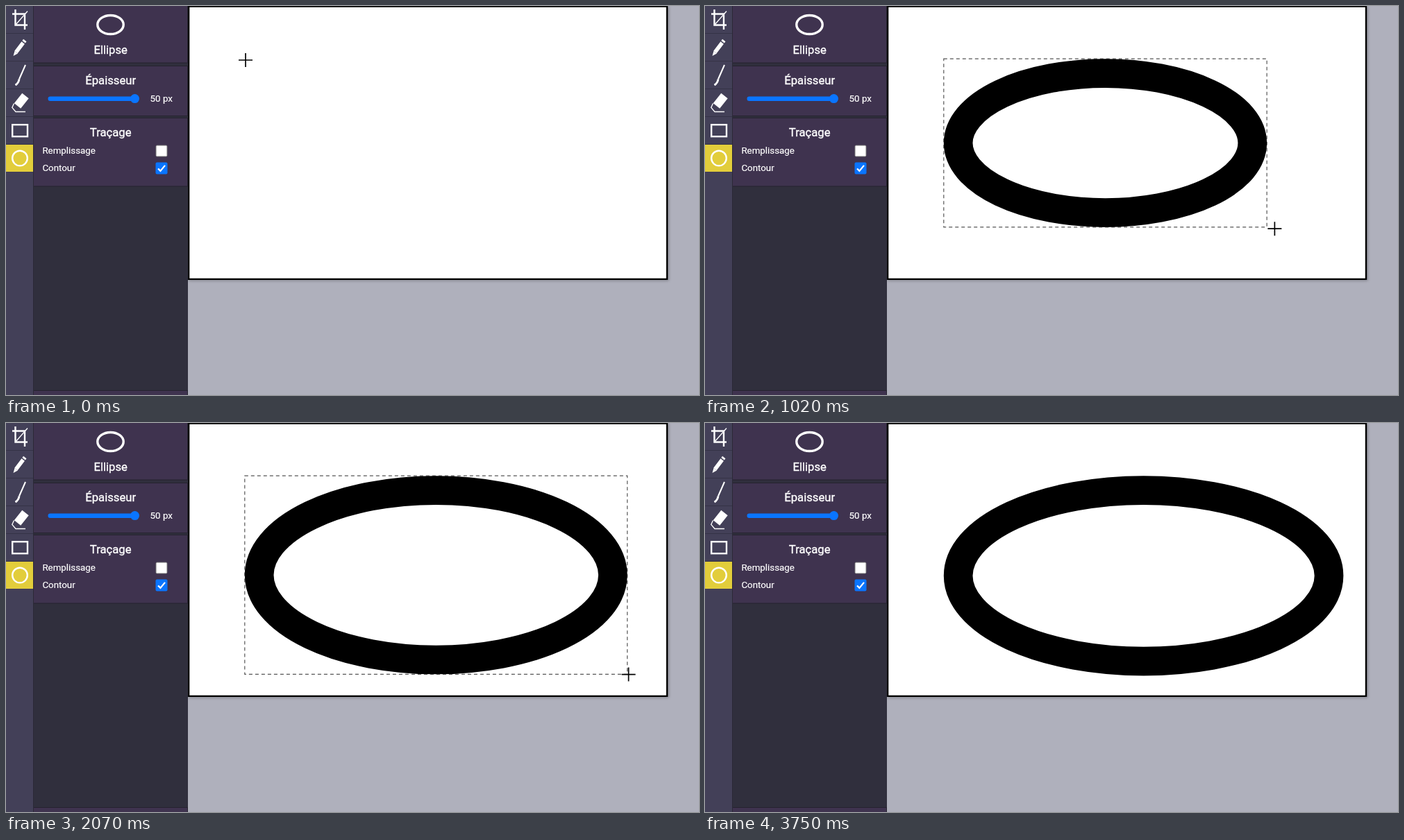
Write an HTML page that moves like this. It is 998 px wide and 561 px high and loops after 5.16 s.

```html
<!DOCTYPE html>
<html lang="fr">
<head>
<meta charset="utf-8">
<title>Ellipse</title>
<style>
html, body { margin: 0; width: 100%; height: 100%; overflow: hidden; background: #afb0bc; }
svg { display: block; width: 998px; height: 561px; }
text { font: 13.34px Roboto, sans-serif; fill: #fff; stroke: #fff; stroke-width: .2px; }
.title { font-size: 16.68px; text-anchor: middle; stroke-width: .35px; }
.icon { fill: none; stroke: #fff; }
</style>
</head>
<body>
<svg viewBox="0 0 998 561">
  <defs>
    <filter id="shadow" x="-5%" y="-5%" width="110%" height="110%">
      <feDropShadow dx="1" dy="1" stdDeviation="2" flood-color="#000" flood-opacity=".3"/>
    </filter>
    <clipPath id="sheet"><rect x="264.300" y="1.700" width="686.500" height="391"/></clipPath>
  </defs>
  <rect width="998" height="561" fill="#afb0bc"/>

  <!-- drawing surface -->
  <rect x="262" y="0" width="691.200" height="395" filter="url(#shadow)"/>
  <g clip-path="url(#sheet)">
    <rect width="998" height="561" fill="#fff"/>
    <rect id="box" fill="none" stroke="#555" stroke-width="1.2" stroke-dasharray="5 4"/>
    <ellipse id="ring" fill="none" stroke="#000" stroke-width="41.7"/>
  </g>

  <!-- option panel -->
  <rect x="39" width="223" height="561" fill="#302f3d"/>
  <g fill="#3f334f" stroke="#25232f">
    <rect x="39.5" y="-2.5" width="222" height="84.5"/>
    <rect x="39.5" y="86.5" width="222" height="72"/>
    <rect x="39.5" y="161.5" width="222" height="98.5"/>
    <rect x="39.5" y="554.5" width="222" height="10"/>
  </g>
  <ellipse class="icon" cx="150.5" cy="27" rx="18.7" ry="13.5" stroke-width="3.4"/>
  <text class="title" x="150.7" y="68.8">Ellipse</text>
  <text class="title" x="150.7" y="113">Épaisseur</text>
  <text class="title" x="150.7" y="188.2">Traçage</text>
  <text x="207.6" y="138">50 px</text>
  <text x="52.4" y="213.3">Remplissage</text>
  <text x="52.4" y="238.3">Contour</text>
  <rect x="60.5" y="130.400" width="130" height="6.600" rx="3.3" fill="#0a75ff"/>
  <circle cx="185.5" cy="133.6" r="6.5" fill="#0a75ff"/>
  <rect x="216" y="201" width="16" height="16" rx="1.5" fill="#fff" stroke="#767676"/>
  <rect x="215.5" y="225.5" width="17" height="17" rx="2" fill="#0a75ff"/>
  <path class="icon" d="M219 234.5l3.4 3.4 6.6-8" stroke-width="2.2"/>

  <!-- toolbar -->
  <rect width="39" height="561" fill="#434058"/>
  <path d="M19.5 39V200" stroke="#353346" stroke-width="39" stroke-dasharray="1 39"/>
  <path d="M39.5 0V561" stroke="#2b2937"/>
  <rect y="200" width="39" height="39" fill="#e2cd3b"/>
  <g class="icon" stroke-width="2.4">
    <path d="M13.5 5V27.5H31M9 11.5H27V34"/>
    <path d="M13.5 27.5L31 7.5" stroke-width="1.4"/>
    <rect x="9.2" y="171.200" width="21.8" height="17"/>
    <circle cx="20" cy="219.600" r="10.8"/>
    <path d="M14.500 66.500L24.700 53M25.600 51.700L27.300 49.500" stroke-width="5.6"/>
    <path d="M10.500 72l2-7 4.500 3.400z" fill="#fff" stroke="none"/>
    <path d="M28 85L19 105.500" stroke-width="2"/>
    <path d="M19 105.500q-1 6-5.500 8.500" stroke-width="2.8"/>
    <path d="M28 129.500L16.500 144" stroke-width="12"/>
    <path d="M11.500 140.500L8.800 146.500 14 152.500H28" stroke-width="1.3"/>
  </g>

  <path id="cursor" d="M-10 0H10M0-10V10" stroke="#000" stroke-width="1.7"/>
</svg>
<script>
const LOOP = 5160, STEP = 30, HALF = 20.85;
const AX = 343.8, AY = 76.2;   // corner where the drag begins

// key points of the hand's path: time, x, y
const path = [
  [0, 345, 78], [90, 344, 76], [390, 352, 198], [420, 358, 206], [540, 391, 239],
  [750, 690, 305.6], [780, 703, 306], [1080, 834, 325], [1290, 847, 335],
  [1320, 850.5, 338.5], [1620, 865, 359], [1710, 884, 361], [1740, 884, 361],
  [2430, 915.6, 364.4], [2610, 919, 364.4], [3630, 920, 364.4], [3720, 971, 366]
];
const last = path.length - 1;

const slope = (i, k) => (path[i + 1][k] - path[i][k]) / (path[i + 1][0] - path[i][0]);

// monotone tangent: flat at stops, harmonic mean elsewhere
function tangent(i, k) {
  if (i === 0 || i === last) return 0;
  const a = slope(i - 1, k), b = slope(i, k);
  return a * b > 0 ? 2 * a * b / (a + b) : 0;
}

function pointer(t) {
  if (t >= path[last][0]) return path[last].slice(1);
  const i = path.findIndex(p => p[0] > t) - 1;
  const p = path[i], q = path[i + 1], d = q[0] - p[0], u = (t - p[0]) / d;
  const ease = u * u * (3 - 2 * u);
  return [1, 2].map(k => p[k] + (q[k] - p[k]) * ease +
    d * u * (1 - u) * ((1 - u) * tangent(i, k) - u * tangent(i + 1, k)));
}

const $ = id => document.getElementById(id);
const ring = $('ring'), box = $('box'), cursor = $('cursor');

function set(el, attrs) {
  for (const k in attrs) el.setAttribute(k, attrs[k]);
}
const show = (el, on) => set(el, { visibility: on ? 'visible' : 'hidden' });

function draw(ms) {
  const t = Math.floor(ms / STEP) * STEP;
  set(cursor, { transform: `translate(${pointer(t)})` });
  show(cursor, t < 3750);

  const drawing = t >= 150;
  show(ring, drawing);
  show(box, drawing && t < 3480);
  if (!drawing) return;

  // the shape trails the pointer by one step
  const [x, y] = pointer(Math.min(t, 2970) - STEP);
  const w = Math.max(0.2, x - AX), h = Math.max(0.2, y - AY);
  set(ring, {
    cx: AX + w / 2, cy: AY + h / 2,
    rx: Math.abs(w / 2 - HALF), ry: Math.abs(h / 2 - HALF)
  });
  set(box, { x: AX, y: AY, width: w, height: h });
}

const start = performance.now();
function tick() {
  draw((performance.now() - start) % LOOP);
  requestAnimationFrame(tick);
}
draw(0);
requestAnimationFrame(tick);
</script>
</body>
</html>
```
